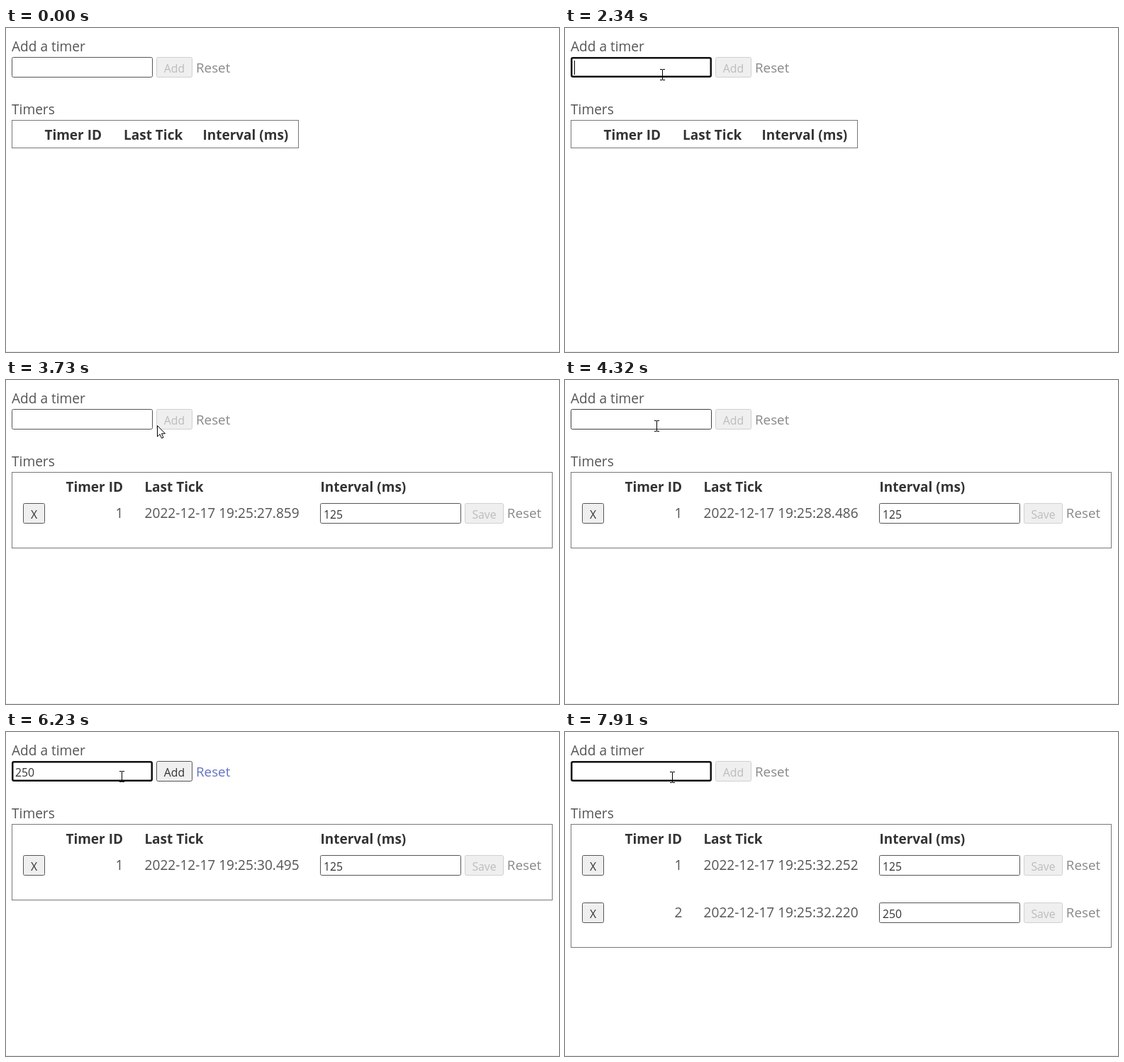
These frames come from a looping animation (780x458 px, 8 s). An HTML page:

```html
<!DOCTYPE html>
<html lang="en">
<head>
<meta charset="utf-8">
<title>Timers</title>
<style>
  html, body { margin: 0; width: 100%; height: 100%; overflow: hidden; background: #fff; }
  svg { display: block; width: 780px; height: 458px; font: 19.1px "Open Sans", "Noto Sans", sans-serif; }
  text { fill: #555; white-space: pre; }
  .head { font-weight: 700; font-size: 19px; fill: #333; }
  .small { font-size: 15.8px; fill: #333; }
  .off { fill: #bcbcbc; }
  .reset { font-size: 18.8px; fill: #888; }
  .reset.on { fill: #6272c3; }
  .frame { fill: none; stroke: #777; }
</style>
</head>
<body>
<svg id="stage" viewBox="0 0 780 458"></svg>
<script>
const LOOP = 8000, BLINK = 525, MOVE = 640, DIGIT = 8.9, ROW = 67;
const stage = document.getElementById("stage");

const set = (node, attrs) => { for (const key in attrs) node.setAttribute(key, attrs[key]); };
const show = (node, on) => set(node, { visibility: on ? "visible" : "hidden" });

function add(tag, attrs, parent = stage, text = "") {
  const node = document.createElementNS("http://www.w3.org/2000/svg", tag);
  set(node, attrs);
  node.textContent = text;
  parent.append(node);
  return node;
}
const label = (x, y, text, cls = "", parent = stage) => add("text", { x, y, class: cls }, parent, text);

const box = (x, y, w, fill, stroke, parent = stage) =>
  add("rect", { x: x + .5, y: y + .5, width: w - 1, height: 28, rx: 2, fill, stroke }, parent);

// Returns a function that sets the enabled and hover look
function button(x, y, w, text, parent = stage) {
  const face = box(x, y, w, "#efefef", "", parent);
  const caption = add("text", { x: x + w / 2, y: y + 22, "text-anchor": "middle" }, parent, text);
  return (on, hover = false) => {
    set(face, { fill: hover ? "#e5e5e5" : "#efefef", stroke: on ? "#555" : "#d0d0d0" });
    set(caption, { class: on ? "small" : "small off" });
  };
}

function row(index, value) {
  const g = add("g", {}), y = 174 + ROW * index;
  button(24, y, 31, "X", g)(true);
  add("text", { x: 165.5, y: y + 21, "text-anchor": "end" }, g, index + 1);
  const stamp = label(195.6, y + 21, "", "", g);
  box(443, y, 199, "#fff", "#555", g);
  label(448, y + 22, value, "small", g);
  button(647, y, 55, "Save", g)(false);
  label(706.8, y + 21, "Reset", "reset", g);
  return { g, stamp };
}

// Typing sessions: when the field is focused, when keys start, when Add is clicked
const KEY_GAP = 150;
const sessions = [
  { focus: 1290, keys: 2600, text: "125", sent: 3670 },
  { focus: 4440, keys: 5400, text: "250", sent: 6680 },
  { focus: 7330, keys: LOOP, text: "", sent: LOOP }
];
// Timers: first tick on the wall clock and real step, both in ms
const timers = [
  { first: 27859.4, step: 125.51 },
  { first: 30955, step: 253 }
];
// Pointer stops: arrival time, x, y
const stops = [
  [70, 711, 440], [830, 128, 46], [1150, 131, 52], [1880, 137, 66], [3330, 215, 64],
  [4320, 129, 65], [5110, 123, 72], [6600, 227, 48], [7520, 151, 64]
];

label(8, 33, "Add a timer");
label(8, 122, "Timers");
add("rect", { x: 0, y: 457, width: 780, height: 1, fill: "#ececec" });
const field = box(8, 41, 199, "#fff", "#555");
const entry = label(13, 63, "", "small");
const caret = add("rect", { y: 46, width: 1, height: 20 });
const addButton = button(212, 41, 51, "Add");
const reset = label(268, 62.5, "Reset", "reset");
const frame = add("rect", { x: 8.5, y: 130.5, class: "frame" });
const heads = ["Timer ID", "Last Tick", "Interval (ms)"].map(text => label(0, 157.5, text, "head"));
const rows = timers.map((timer, i) => row(i, sessions[i].text));

// Pointers, both with their hot spot at 0,0
const arrow = add("path", {
  d: "M.5 .5V16L4 12.7L6.6 18.3L9 17.2L6.5 11.8H11.5Z", fill: "#fff", stroke: "#000"
});
const beam = add("path", {
  d: "M-3 -7.5H0L.5 -7L1 -7.5H4M.5 -7V7M-3 7.5H0L.5 7L1 7.5H4", fill: "none", stroke: "#000"
});

const ease = p => p * p * (3 - 2 * p);

// Each move ends on its stop and takes at most MOVE ms
function pointer(t) {
  const i = stops.findIndex(stop => stop[0] > t);
  if (i < 1) return stops[i < 0 ? stops.length - 1 : 0].slice(1);
  const [from, to] = [stops[i - 1], stops[i]];
  const length = Math.min(MOVE, to[0] - from[0]);
  const p = ease(Math.max(0, 1 - (to[0] - t) / length));
  return [1, 2].map(k => Math.round(from[k] + (to[k] - from[k]) * p));
}

function typed(t) {
  const s = sessions.find(s => t >= s.focus && t < s.sent);
  if (!s) return { text: "", focused: false, blinkOn: false };
  const count = Math.min(s.text.length, Math.max(0, Math.floor((t - s.keys) / KEY_GAP) + 1));
  const since = count ? s.keys + (count - 1) * KEY_GAP : s.focus;
  return { text: s.text.slice(0, count), focused: true, blinkOn: Math.floor((t - since) / BLINK) % 2 === 0 };
}

function lastTick({ first, step }, t) {
  const wall = 24140.7 + 1.029 * t;
  const ms = Math.floor(first + step * Math.max(0, Math.floor((wall - first) / step)));
  return "2022-12-17 19:25:" + (ms / 1000).toFixed(3);
}

function draw(t) {
  const [x, y] = pointer(t);
  const over = (left, right) => t >= 70 && x >= left && x < right && y >= 41 && y < 70;
  const inField = over(8, 207);
  for (const shape of [arrow, beam]) set(shape, { transform: `translate(${x} ${y})` });
  show(arrow, t >= 70 && !inField);
  show(beam, inField);

  const { text, focused, blinkOn } = typed(t);
  const inset = focused ? 1.25 : .5;
  set(field, {
    x: 8 + inset, y: 41 + inset, width: 199 - 2 * inset, height: 29 - 2 * inset,
    "stroke-width": 2 * inset, stroke: focused ? "#101010" : inField ? "#404040" : "#555"
  });
  entry.textContent = text;
  set(caret, { x: 13 + text.length * DIGIT });
  show(caret, blinkOn);
  addButton(text !== "", text !== "" && over(212, 263));
  set(reset, { class: text ? "reset on" : "reset" });

  const count = sessions.filter(s => t >= s.sent).length;
  set(frame, { width: count ? 762 : 404, height: count ? 40 + ROW * count : 39 });
  const columns = count ? [84.4, 195.4, 443.4] : [54.4, 166, 277.4];
  heads.forEach((head, i) => set(head, { x: columns[i] }));
  rows.forEach(({ g, stamp }, i) => {
    show(g, i < count);
    stamp.textContent = lastTick(timers[i], t);
  });
}

const start = performance.now();
function loop() {
  draw((performance.now() - start) % LOOP);
  requestAnimationFrame(loop);
}
loop();
</script>
</body>
</html>
```
